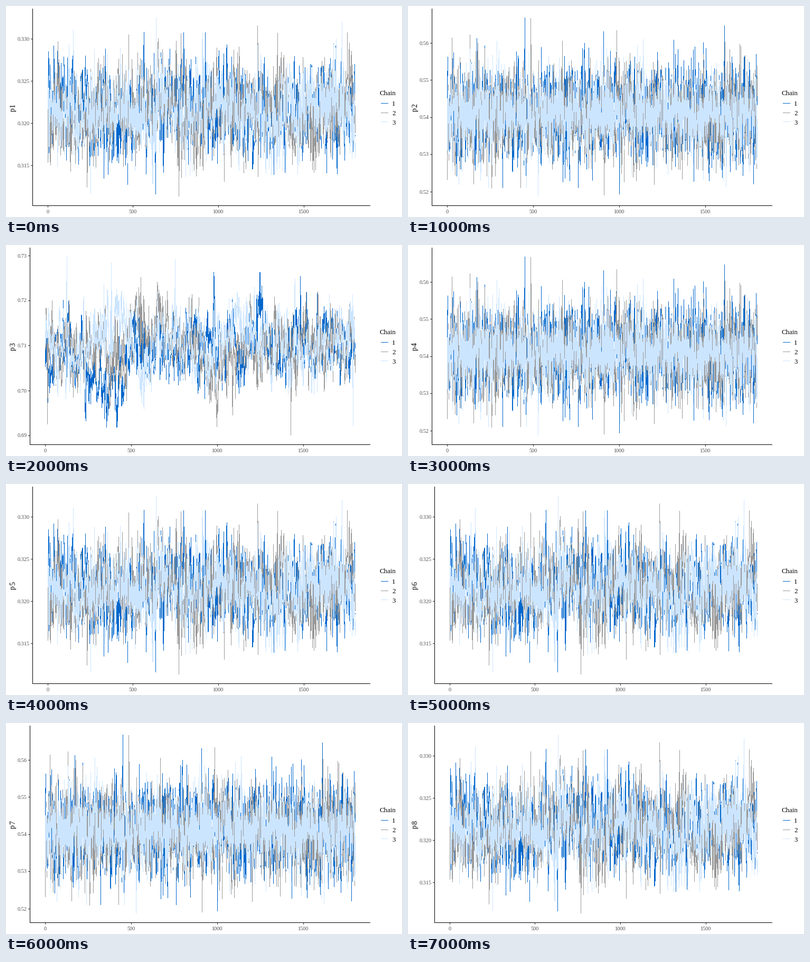
Write a matplotlib script that moves like this. It is 750 by 400 pixels and loops after 8 s.

```python
import numpy as np
import matplotlib.pyplot as plt
from matplotlib.animation import FuncAnimation

W, H, DPI = 750, 400, 100
PT = 72 / DPI  # points per pixel
COLORS = ("#0066cc", "#999999", "#cce5ff")
DRAWS, X_END = 1800, 661

plt.rcParams["font.family"] = "Liberation Serif"
plt.rcParams["path.simplify"] = False


def autoregress(rng, rho):
    """Unit-variance AR(1) series."""
    z = rng.normal(size=DRAWS)
    for k in range(1, DRAWS):
        z[k] = rho * z[k - 1] + np.sqrt(1 - rho ** 2) * z[k]
    return z


def make_plot(seed, left, x0, mean, sd, rho, slow_sd, peaks, ticks):
    """Three chains in pixels: fast noise, a slow drift and key outliers."""
    rng = np.random.default_rng(seed)
    x = np.linspace(x0, X_END, DRAWS)
    chains = [mean + sd * autoregress(rng, rho) + slow_sd * autoregress(rng, 0.985)
              for _ in COLORS]
    chains = [np.clip(y, 50, 345) for y in chains]
    for chain, px, py in peaks:
        chains[chain][np.argmin(abs(x - px))] = py
    # Whole pixel columns keep every stroke one pixel wide.
    return dict(left=left, x0=x0, x=np.floor(x) + 0.5, chains=chains, ticks=ticks)


def y_ticks(first, step, count, top, gap, digits):
    return [(f"{first - k * step:.{digits}f}", top + k * gap) for k in range(count)]


TIGHT = make_plot(
    3, 50, 79, 199, 43, 0.4, 15,
    [(2, 284, 22), (2, 636, 30), (2, 128, 45), (1, 477, 37), (1, 332, 52),
     (1, 327, 361), (0, 283, 357), (2, 161, 356)],
    y_ticks(0.330, 0.005, 4, 62, 80, 3))
WIDE = make_plot(
    8, 45, 74, 204, 46, 0.05, 0,
    [(0, 221, 22), (1, 233, 23), (0, 599, 37), (1, 395, 46), (0, 371, 48),
     (2, 247, 361), (1, 372, 359), (0, 401, 357)],
    y_ticks(0.56, 0.01, 5, 70, 70.5, 2))
SLOW = make_plot(
    21, 45, 74, 194, 33, 0.7, 27,
    [(2, 115, 22), (2, 320, 27), (2, 200, 33), (0, 558, 59), (1, 255, 62),
     (1, 540, 361), (2, 657, 343), (1, 79, 340)],
    y_ticks(0.73, 0.01, 5, 20, 85.4, 2))
SEQUENCE = (TIGHT, WIDE, SLOW, WIDE, TIGHT, TIGHT, WIDE, TIGHT)

fig = plt.figure(figsize=(W / DPI, H / DPI), dpi=DPI, facecolor="white")
ax = fig.add_axes([0, 0, 1, 1])


def line(xs, ys, color="black"):
    # Aliased strokes fill every pixel they touch, so a thin one fills just one.
    ax.plot(xs, ys, color=color, lw=0.4 * PT, antialiased=False, snap=False,
            solid_capstyle="butt", solid_joinstyle="bevel")


def text(x, y, s, px, color="black", **kw):
    ax.text(x, y, s, fontsize=px * PT, color=color, va="baseline", **kw)


def draw_axes(plot):
    left = plot["left"]
    line([left + 0.5] * 2, [5, 379])
    line([left, 690], [378.5] * 2)
    for label, y in plot["ticks"]:
        row = int(y) + 0.5
        line([left - 3, left], [row] * 2, "#333333")
        text(left - 5.5, row + 3, label, 10.3, "#4d4d4d", ha="right")
    for value in range(0, 1501, 500):
        col = int(plot["x0"] + value * (X_END - plot["x0"]) / DRAWS) + 0.5
        line([col] * 2, [379, 382], "#333333")
        text(col - 0.8, 392.7, str(value), 10.3, "#4d4d4d", ha="center")


def draw_legend():
    text(707.5, 169, "Chain", 13)
    for k, color in enumerate(COLORS):
        y = 184.5 + 17.7 * k
        line([710, 724], [int(y) + 0.5] * 2, color)
        text(731, y + 4.7, str(k + 1), 13)


def update(i):
    ax.clear()
    ax.set_xlim(0, W)
    ax.set_ylim(H, 0)
    ax.axis("off")
    plot = SEQUENCE[i]
    for y, color in zip(plot["chains"], COLORS):
        line(plot["x"], y, color)
    draw_axes(plot)
    draw_legend()
    for y, s in ((200.5, "p"), (192, str(i + 1))):
        text(17, y, s, 14, rotation=90, rotation_mode="anchor", ha="left")
    return []


anim = FuncAnimation(fig, update, frames=len(SEQUENCE), init_func=lambda: [],
                     interval=1000, repeat=True, repeat_delay=0)
plt.show()
```
